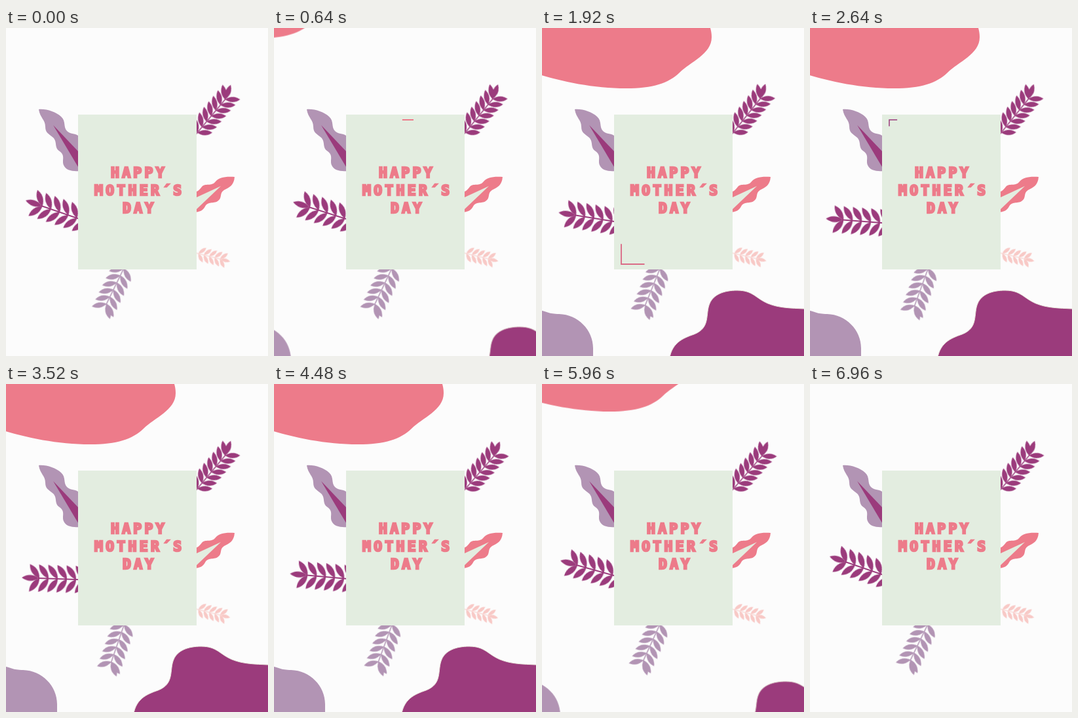
An HTML page for the animation above (7000 ms loop, 400 px wide and 500 px high).

```html
<!DOCTYPE html>
<html lang="en">
<head>
<meta charset="utf-8">
<title>Happy Mother's Day</title>
<style>
  html, body { margin: 0; width: 100%; height: 100%; overflow: hidden; background: #fcfcfc; }
  svg { display: block; width: 100%; height: 100%; }

  .blob { animation: 7s cubic-bezier(.65, 0, .35, 1) infinite; }
  .pink { --in: -190px, -95px; --out: -50px, -100px; animation-name: late; }
  .plum { --in: 148px, 106px; --out: 148px, 106px; animation-name: early; }
  .lilac { --in: -100px, 32px; --out: -100px, 32px; animation-name: early; }

  @keyframes late {
    0%, 2.86% { transform: translate(var(--in)); }
    20%, 77.86% { transform: none; }
    92.43%, 99.9% { transform: translate(var(--out)); }
    100% { transform: translate(var(--in)); }
  }
  @keyframes early {
    0%, 2.14% { transform: translate(var(--in)); }
    16.4%, 77.86% { transform: none; }
    92.43%, 100% { transform: translate(var(--out)); }
  }

  .sway { animation: sway 3.5s cubic-bezier(.37, 0, .63, 1) infinite alternate; }
  @keyframes sway {
    from { transform: rotate(var(--a)); }
    to { transform: rotate(var(--b)); }
  }

  .trace { fill: none; animation: trace 7s linear infinite; }
  @keyframes trace {
    0%, 6.03% { stroke-dasharray: 0 2000; stroke-dashoffset: 0; stroke: #ed7b8a; stroke-width: 2; }
    17.143% { stroke-dasharray: 61 2000; stroke-dashoffset: -266; stroke: #ed7b8a; stroke-width: 2; }
    24.286% { stroke-dasharray: 80 2000; stroke-dashoffset: -437; stroke: #ed7b8a; stroke-width: 2; }
    37.714% { stroke-dasharray: 22 2000; stroke-dashoffset: -758; stroke: #9b3b7c; stroke-width: 1.5; }
    39%, 100% { stroke-dasharray: 0 2000; stroke-dashoffset: -790; stroke: #9b3b7c; stroke-width: 1.5; }
  }

  text {
    font: bold 21.4px "DejaVu Sans Mono", monospace;
    letter-spacing: 4.3px;
    fill: #ed7b8a;
    stroke: #ed7b8a;
    stroke-width: 2.7;
    stroke-linejoin: miter;
  }
</style>
</head>
<body>
<svg viewBox="0 0 400 500">
  <path class="blob pink" fill="#ed7b8a" d="M-10 69C30 82 80 92 128 92C170 92 193 84 210 68C226 52 259 40 259 14C259 8 258 4 257 0V-10H-10Z"/>
  <path class="blob lilac" fill="#b294b4" d="M-5 430C8 432 10 436 26 436C55 437 78 460 78 488V510H-5Z"/>
  <path class="blob plum" fill="#9b3b7c" stroke="#e9e5da" d="M194 510C196 480 215 473 232 467C258 457 249 436 256 420C262 406 278 400 298 400C322 400 326 412 345 420C362 427 380 427 400 428H420V520H194Z"/>

  <g id="ferns"></g>

  <g>
    <path fill="#b294b4" d="M50 124C62 123 76 128 84 135C92 142 87 151 93 157C99 163 106 159 112 166V218C102 219 91 217 88 209C85 201 91 195 82 188C73 182 79 174 72 167C65 161 60 160 60 150C60 140 52 137 50 124Z"/>
    <path fill="#9b3b7c" d="M72 148L112 190V215Z"/>
  </g>
  <g>
    <path fill="#ed7b8a" d="M349 227C334 226 325 228 320 234C314 242 304 236 299 242C296 246 293 249 289 250V281C296 280 301 278 304 272C308 264 317 268 323 264C331 259 325 252 333 247C341 243 348 240 349 227Z"/>
    <path fill="#e3ede0" d="M328 241L289 259V278Z"/>
  </g>

  <rect x="110" y="132" width="181" height="236" fill="#e3ede0"/>
  <path class="trace" d="M121 140H285V360H121V140H285"/>
  <text x="160" y="227.7">HAPPY</text>
  <text x="135" y="254.7">MOTHER´S</text>
  <text x="178" y="281.7">DAY</text>
</svg>
<script>
  const leaflet = (x, angle, len, width) =>
    `<path transform="translate(${x}) rotate(${angle})" d="M0 0Q${len * .5} ${-width} ${len} 0Q${len * .5} ${width} 0 0Z"/>`;

  // Stem along +x from the pivot, with paired leaflets and one at the tip.
  function fern({ x, y, angle, stem, pairs, gap, len, width, spread, bend = 0, color, a, b, delay = 0 }) {
    let parts = `<path d="M0 0H${stem}" stroke="${color}" stroke-width="${width * .2}"/>`;
    parts += leaflet(stem - 1, bend, len, width);
    for (let i = 0; i < pairs; i++) {
      const at = stem - 2 - i * gap;
      parts += leaflet(at, -spread, len, width) + leaflet(at, spread, len, width);
    }
    return `<g transform="translate(${x} ${y}) rotate(${angle})" fill="${color}">
      <g class="sway" style="--a:${a}deg;--b:${b}deg;animation-delay:${delay}ms">${parts}</g></g>`;
  }

  const ferns = [
    { x: 135, y: 299, angle: 199, stem: 86, pairs: 6, gap: 14, len: 26, width: 9,
      spread: 54, color: "#9b3b7c", a: 0, b: -17 },
    { x: 285, y: 168, angle: -50, stem: 79, pairs: 7, gap: 11, len: 23, width: 8,
      spread: 50, bend: -20, color: "#9b3b7c", a: 1.4, b: -1.4, delay: -1750 },
    { x: 182, y: 362, angle: 116, stem: 67, pairs: 6, gap: 12, len: 23, width: 8,
      spread: 54, bend: -40, color: "#b294b4", a: 0, b: -7 },
    { x: 286, y: 342, angle: 14, stem: 44, pairs: 5, gap: 8.5, len: 15, width: 5.5,
      spread: 50, color: "#f8c9c6", a: 1, b: -1, delay: -1750 }
  ];
  document.getElementById("ferns").innerHTML = ferns.map(fern).join("");
</script>
</body>
</html>
```
